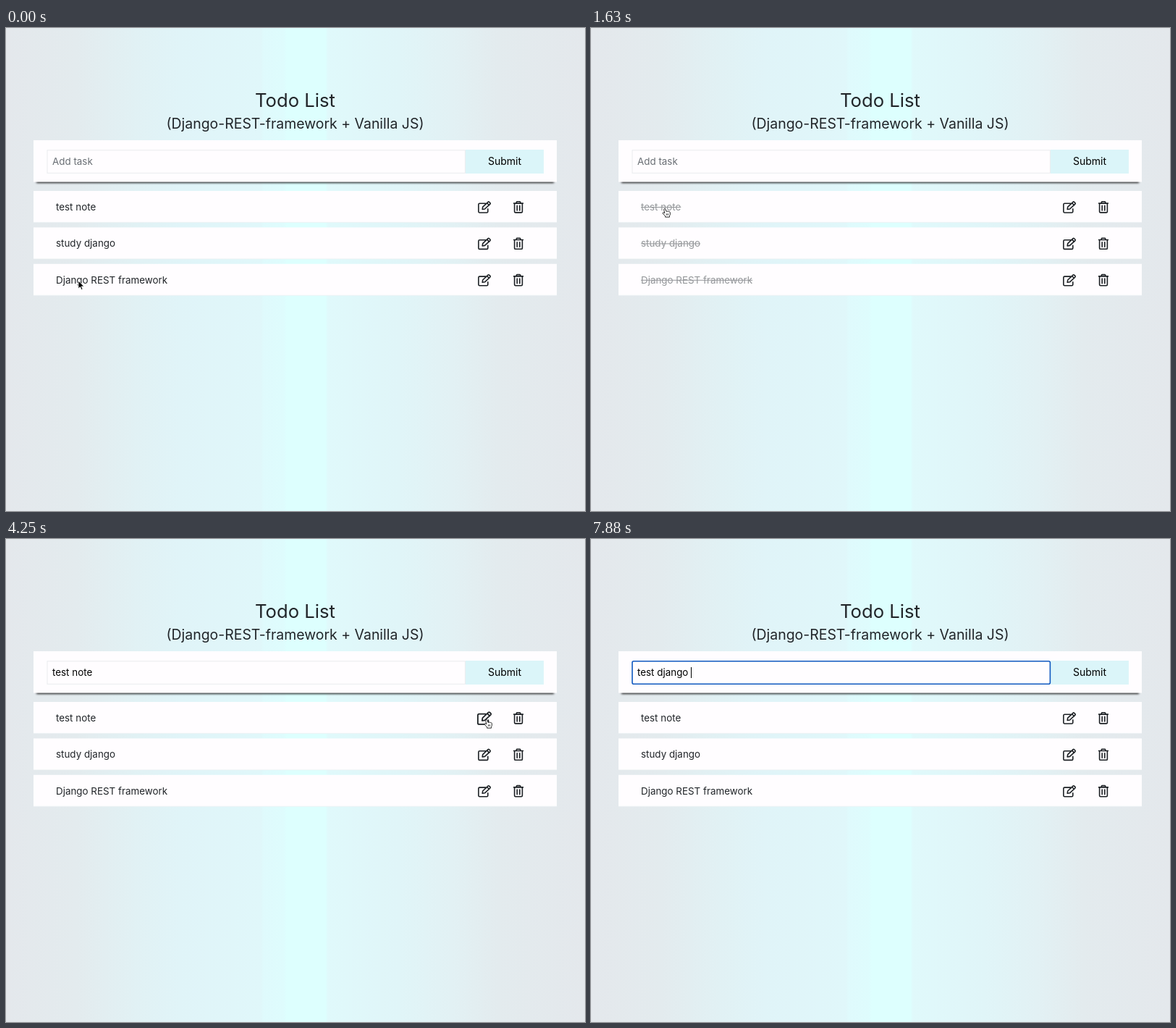
Recreate the animation shown at these times as an HTML page. Size 800 by 667 pixels, loop 8000 ms.

```html
<!DOCTYPE html>
<html lang="en">
<head>
<meta charset="utf-8">
<title>Todo List</title>
<style>
html, body { margin: 0; width: 100%; height: 100%; overflow: hidden; }
body { background: linear-gradient(90deg, #e4e8ec 0, #e3ebee 12%, #e1f1f4 22.2%, #e0f4f8 30%, #e0f7fa 44%,
  #dffafc 44.5%, #defcfd 48%, #ddfffe 48.5%, #ddfffe 55.2%, #e0f9fb 55.6%, #e0f5f8 68%, #e2f1f4 77%, #e3ebee 85%, #e4e8ec 100%); }
svg { display: block; width: 100vw; height: 100vh; }
text { font: 13.4px Inter, "Open Sans", sans-serif; fill: #212529; white-space: pre; }
.mid { text-anchor: middle; }
.icon { fill: none; stroke: #1c2024; stroke-width: 1.6; stroke-linejoin: round; stroke-linecap: round; }
.panel { fill: #fffdff; }
.done text { fill: #94979a; }
.done .strike { visibility: visible; }
.strike { visibility: hidden; stroke: #94979a; }
#cursor path { stroke-linejoin: round; }
</style>
</head>
<body>
<svg viewBox="0 0 800 667" preserveAspectRatio="none">
  <defs>
    <filter id="blur" x="-5%" y="-50%" width="110%" height="200%"><feGaussianBlur stdDeviation="1.8"/></filter>
    <g id="edit" class="icon">
      <path d="M1.5-5H-6.6q-1.5 0-1.5 1.5V6.2q0 1.5 1.5 1.5H3.3q1.5 0 1.5-1.5V2.6"/>
      <path d="M-2.8 3.2l.5-3.3L5-7q.8-.7 1.6 0l1.3 1.3q.7.8 0 1.6L.5 2.7ZM3.6-5.6l3 3"/>
    </g>
    <path id="trash" class="icon" d="M-6.4-5.2H6.4M-3.2-5.4l1-2.1h4.4l1 2.1M-5.4-5V6.2q0 1.4 1.4 1.4H4q1.4 0 1.4-1.4V-5M-1.8-2V4.6M1.8-2V4.6"/>
  </defs>

  <text class="mid" x="399.5" y="109" style="font-size:25.7px">Todo List</text>
  <text class="mid" x="399.5" y="139" style="font-size:19.45px">(Django-REST-framework + Vanilla JS)</text>

  <rect x="42" y="180" width="715" height="34" fill="#000" opacity=".85" filter="url(#blur)"/>
  <rect class="panel" x="38" y="155" width="723" height="57.6"/>
  <rect x="635" y="168" width="108" height="33" fill="#dbf5f9"/>
  <text class="mid" x="689" y="189" style="font-size:14px;fill:#000">Submit</text>
  <rect id="box" x="57" y="168.8" width="577.4" height="31.5" fill="#fffdff"/>
  <text id="field" x="64" y="189"></text>
  <path id="caret" d="M0 177V192" stroke="#000"/>

  <g id="list"></g>

  <g id="cursor">
    <path id="arrow" fill="#000" stroke="#fff" stroke-width=".8" d="M0 0V11L2.5 8.6 4.2 12.4 6 11.6 4.3 7.9H7.8Z"/>
    <path id="hand" fill="#fff" stroke="#111" stroke-width=".9" d="M-1.3 1.6Q-1.2.5-.2.6T1.1 1.6L2 4.4q.8-.8 1.7-.1 1-.6 1.8.3 1.2-.3 1.7.7l.2 3-.9 2.2v1.6H.6V10.7L-2.8 7.2q-.4-1.2.7-1.4.8 0 1.9 1.1ZM2.6 7.3v2.2M4.4 7.3v2.2"/>
    <path id="beam" fill="none" stroke="#222" d="M-2.5-5.5Q0-5.5 0-4V4.5Q0 6-2.5 6M2.5-5.5Q0-5.5 0-4M0 4.5Q0 6 2.5 6M-1.5 2.5H1.5"/>
  </g>
</svg>
<script>
const $ = id => document.getElementById(id);
const STEP = 125, LOOP = 8000;

// Spans of steps in which each task is struck through
const tasks = [
  ["test note", 13, 16],
  ["study django", 7, 20],
  ["Django REST framework", 2, 24]
];

// Pointer path: step, x, y, shape from that step on
const path = [
  [0, 100, 349, "arrow"], [1, 101, 348, "hand"], [4, 101, 346, "hand"], [6, 102, 299, "hand"],
  [8, 102, 297, "hand"], [10, 102, 249, "hand"], [17, 102, 249, "hand"], [19, 118, 297, "hand"],
  [20, 120, 298, "hand"], [21, 134, 333, "hand"], [22, 136, 344, "hand"], [24, 137, 344, "arrow"],
  [25, 220, 300, "arrow"], [27, 480, 214, "arrow"], [28, 590, 204, "arrow"], [30, 652, 236, "arrow"],
  [31, 664, 249, "hand"], [35, 664, 249, "hand"], [36, 610, 235, "arrow"], [38, 320, 198, "beam"],
  [40, 164, 190, "beam"], [64, 164, 190, "beam"]
];

$("list").innerHTML = tasks.map(([name], i) => `
  <g transform="translate(0 ${225 + 50.4 * i})">
    <rect class="panel" x="38" width="723" height="43.6"/>
    <path d="M38 43.4H761" stroke="#e6ecef" stroke-width=".6"/>
    <text x="69" y="27">${name}</text>
    <path class="strike"/>
    <use href="#edit"/>
    <use href="#trash" transform="translate(708 22.3)"/>
  </g>`).join("");
const rows = [...$("list").children];

function pointer(n) {
  const i = Math.max(0, path.findIndex(k => k[0] > n) - 1);
  const [n0, x0, y0, shape] = path[i], [n1, x1, y1] = path[i + 1];
  const p = (n - n0) / (n1 - n0);
  return { x: x0 + (x1 - x0) * p, y: y0 + (y1 - y0) * p, shape };
}

function typed(n) {
  if (n < 33) return "";
  if (n < 55) return "test note".slice(0, 9 - Math.max(0, Math.min(4, n - 48)));
  return "test " + "django ".slice(0, n < 63 ? Math.min(6, n - 54) : 7);
}

const show = (el, on) => el.style.display = on ? "" : "none";

function draw(n) {
  show($("list"), n !== 12);
  const { x, y, shape } = pointer(n);

  rows.forEach((row, i) => {
    const [, from, to] = tasks[i];
    row.setAttribute("class", n >= from && n < to ? "done" : "");
    const width = row.querySelector("text").getComputedTextLength();
    row.querySelector(".strike").setAttribute("d", `M69 22.5h${width}`);
    const hover = i === 0 && shape === "hand" && x > 650;
    row.querySelector("use").setAttribute("transform", `translate(661 22.3) scale(${hover ? 1.12 : 1})`);
  });

  const focus = n >= 41, value = typed(n), field = $("field");
  field.textContent = value || "Add task";
  field.style.fill = value ? "#000" : "#6a6f75";
  const box = $("box");
  box.setAttribute("stroke", focus ? "#1059c0" : "#e9ebee");
  box.setAttribute("stroke-width", focus ? 1.6 : 1);
  box.setAttribute("rx", focus ? 2 : 0);

  show($("caret"), focus && (n < 44 || n >= 47));
  $("caret").setAttribute("transform", `translate(${Math.round(64 + field.getComputedTextLength()) + .5} 0)`);

  show($("cursor"), n < 49);
  $("cursor").setAttribute("transform", `translate(${x} ${y})`);
  for (const id of ["arrow", "hand", "beam"]) show($(id), id === shape);
}

const start = performance.now();
function tick() {
  draw(Math.floor((performance.now() - start) % LOOP / STEP));
  requestAnimationFrame(tick);
}
tick();
</script>
</body>
</html>
```
